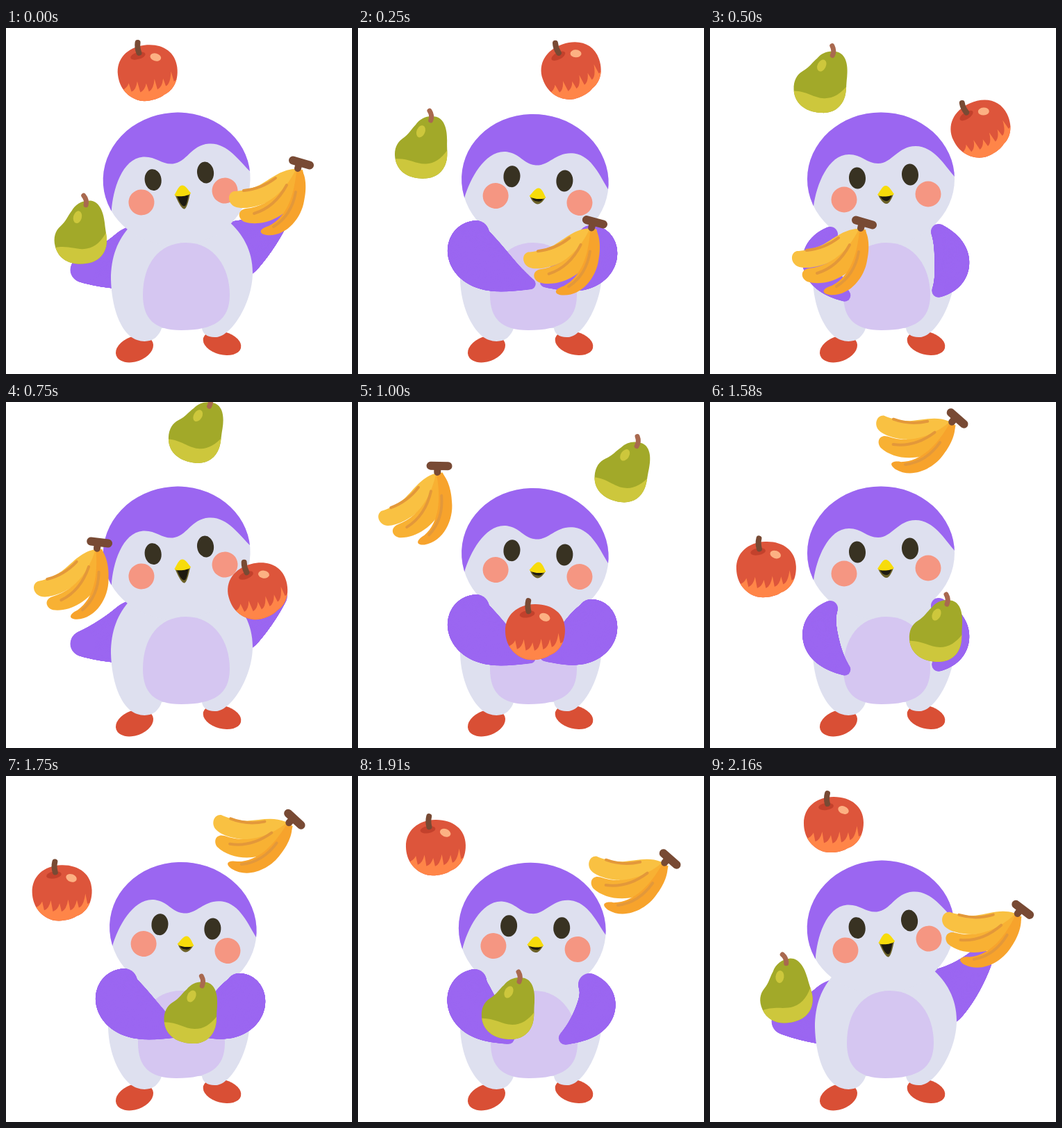
Recreate the animation shown at these times as an HTML page with a canvas. Size 498x498 px, loop 2.25 s.

```html
<!DOCTYPE html>
<html lang="en">
<head>
<meta charset="utf-8">
<title>Juggling penguin</title>
<style>
html, body { margin: 0; width: 100%; height: 100%; overflow: hidden; background: #fff; }
canvas { display: block; width: 498px; height: 498px; }
</style>
</head>
<body>
<canvas id="stage" width="498" height="498"></canvas>
<script>
const ctx = document.getElementById('stage').getContext('2d');
const LOOP = 2250, STEPS = 27, BEAT = 9, TAU = Math.PI * 2;
const PURPLE = '#9b66f1', PALE = '#dee0ef', BELLY = '#d5c6f1', FOOT = '#d94f35';

// ---- helpers
const mix = (a, b, k) => Array.isArray(a) ? a.map((v, i) => mix(v, b[i], k)) : a + (b - a) * k;

function shape(d, color) {
  ctx.fillStyle = color;
  ctx.fill(new Path2D(d));
}

function stroke(d, color, width) {
  ctx.strokeStyle = color;
  ctx.lineWidth = width;
  ctx.lineCap = 'round';
  ctx.stroke(new Path2D(d));
}

function oval(x, y, rx, ry, color, deg = 0) {
  ctx.fillStyle = color;
  ctx.beginPath();
  ctx.ellipse(x, y, rx, ry, deg * Math.PI / 180, 0, TAU);
  ctx.fill();
}

function at(x, y, deg, draw) {
  ctx.save();
  ctx.translate(x, y);
  ctx.rotate(deg * Math.PI / 180);
  draw();
  ctx.restore();
}

// fills a shape, then paints a second one inside it
function layered(d, color, inner, innerColor) {
  shape(d, color);
  ctx.save();
  ctx.clip(new Path2D(d));
  shape(inner, innerColor);
  ctx.restore();
}

// ---- fruit
function spikes() {
  const rim = x => 27 - 0.006 * (x + 5) ** 2;
  let d = 'M-50 20';
  for (let i = 0; i < 7; i++) {
    const x = -39 + 12.5 * i, tip = x + 10;
    d += `L${x} ${rim(x)}Q${x + 7} ${rim(x) - 2} ${tip} ${rim(tip) - 12 - i % 2 * 4}`;
  }
  return d + 'L50 8V50H-50Z';
}

function apple() {
  layered('M-43-2C-43-25-25-40 0-40C25-40 43-26 43-3C43 20 30 31 20 34C12 40-8 42-17 38C-32 32-43 18-43-2Z',
    '#dd553b', spikes(), '#ff8548');
  oval(-11, -26, 11, 5, '#c3412c', -8);
  stroke('M-9-30Q-11-38-9-45', '#784a34', 8);
  oval(14, -21, 8, 5.5, '#fcb183', 22);
}

function pear() {
  ctx.rotate(-16 * Math.PI / 180);
  layered('M-6-33C1-42 12-46 24-43C36-39 39-24 38-8C37 4 38 12 36 20C32 36 20 45 4 45C-16 45-36 36-38 13C-39 0-34-9-26-14C-16-20-13-27-6-33Z',
    '#a2a929', 'M-42 15C-20 13-10 24 6 24C20 24 31 16 42 0V50H-42Z', '#cdc73c');
  oval(1, -23, 6, 9, '#cdc73c', 25);
  stroke('M16-38Q19-45 15-52', '#a9694f', 7);
}

function banana() {
  ctx.translate(45, -48);
  shape('M-10 9C-30 10-45 24-60 32C-75 39-90 41-97 41C-107 44-106 58-96 63C-85 68-60 64-40 52C-20 38-5 25 0 9Z', '#f9c142');
  shape('M-9 12C-18 30-40 62-80 66C-92 68-92 80-82 85C-60 92-30 82-12 60C0 40 6 25 2 10Z', '#f8b133');
  shape('M-7 12C-10 45-20 78-47 91C-61 95-62 102-50 104C-22 107 0 80 4 55C8 38 7 18 0 10Z', '#f7a32c');
  const line = d => stroke(d, '#e3983a', 4);
  line('M-83 40Q-58 38-37 22');
  line('M-68 73Q-38 64-21 32');
  line('M-40 92Q-14 76-8 42');
  stroke('M-3 1L-5 8', '#784a34', 10);
  stroke('M-12-3.5L12 3.5', '#784a34', 12);
}

// ---- orbits: a few [x, y, tilt] points, joined by arcs round the head
const HUB = [240, 190];
const KEYS = [0, 6, 12, 16, 19, 23, 26];

function orbit(points) {
  let last = -Infinity;
  return points.map(([x, y, tilt], i) => {
    const dx = x - HUB[0], dy = y - HUB[1];
    let turn = Math.atan2(dy, dx);
    while (turn < last) turn += TAU;
    last = turn;
    return [KEYS[i], turn, Math.hypot(dx, dy), tilt];
  });
}

function follow(path, f) {
  const n = path.length;
  const key = i => {
    const lap = Math.floor(i / n), [s, turn, r, tilt] = path[(i + n) % n];
    return [s + lap * STEPS, turn + lap * TAU, r, tilt];
  };
  const i = path.findLastIndex(k => k[0] <= f);
  const [a, b, c, d] = [i - 1, i, i + 1, i + 2].map(key);
  const w = c[0] - b[0], u = (f - b[0]) / w;
  const [turn, r, tilt] = [1, 2, 3].map(j => {
    const m0 = (c[j] - a[j]) / (c[0] - a[0]) * w;
    const m1 = (d[j] - b[j]) / (d[0] - b[0]) * w;
    return b[j] * (1 + 2 * u) * (1 - u) ** 2 + m0 * u * (1 - u) ** 2 +
           c[j] * u * u * (3 - 2 * u) + m1 * u * u * (u - 1);
  });
  return [HUB[0] + r * Math.cos(turn), HUB[1] + r * Math.sin(turn), tilt];
}

const FRUIT = [
  [banana, orbit([[380, 242, 0], [177, 328, 0], [86, 150, -15], [206, 54, 12], [295, 48, 25], [388, 144, 25], [391, 221, 21]])],
  [apple, orbit([[204, 64.5, -7], [390, 145, -25], [255, 331, -1], [97, 312, 0], [81, 241, -2], [112, 103, -1], [178, 70, 0]])],
  [pear, orbit([[106, 295, 6], [159, 77, 18], [380, 99, 24], [401, 198, 25], [325, 329, 16], [216, 334, 16], [107, 311, -3]])]
];

// ---- penguin poses
// arm: shoulder, elbow, hand, [shoulder radius, hand radius, bulge]
const OUT = {
  face: [255, 242.5, -4.2], mouth: 16, belly: 0, body: 0, behind: true,
  left: [[190, 330], [150, 345], [110, 348], [46, 18, 0]],
  right: [[330, 320], [362, 303], [389, 279], [42, 16, 0]]
};
const LIFT = { ...OUT,
  left: [[186, 340], [150, 353], [107, 353], [48, 19, 0]],
  right: [[330, 320], [362, 301], [388, 266], [42, 18, 0]]
};
const MID = {
  face: [253.5, 243, 0], mouth: 8, belly: -5, body: -3,
  left: [[173, 297], [135, 341], [195, 386], [11, 8, 16]],
  right: [[329, 293], [368, 341], [328, 379], [11, 9, 15]]
};
const IN = {
  face: [258.5, 246.5, 8.5], mouth: 5, belly: -7, body: -4,
  left: [[170, 296], [140, 335], [250, 369], [19, 7, 25]],
  right: [[335, 302], [357, 337], [268, 366], [18, 7, 25]]
};
const APART = {
  face: [255.5, 247, 6.1], mouth: 5, belly: -6, body: -4,
  left: [[168, 295], [141, 332], [218, 378], [17, 8, 22]],
  right: [[333, 300], [366, 339], [297, 378], [16, 9, 15]]
};

function between(a, b) {
  const pose = {};
  for (const k in a) pose[k] = mix(a[k], b[k], 0.5);
  return pose;
}
const POSES = [OUT, MID, between(MID, IN), IN, between(IN, APART), APART, MID, OUT, LIFT];

// round brush swept from shoulder to hand
function arm([s, e, h, [r0, r1, bulge]]) {
  for (let u = 0; u <= 1; u += 0.01) {
    const [x, y] = mix(mix(s, e, u), mix(e, h, u), u);
    const r = mix(r0, r1, u) + bulge * Math.sin(Math.PI * u);
    oval(x, y, r, r, PURPLE);
  }
}

function arms(pose) {
  arm(pose.left);
  arm(pose.right);
}

function head(mouth) {
  ctx.translate(-253.5, -243);
  oval(246, 217.5, 106, 96, PALE);
  ctx.save();
  ctx.beginPath();
  ctx.ellipse(246, 217.5, 106, 96, 0, 0, TAU);
  ctx.clip();
  shape('M130 257H149C153 226 170 182 200 182C218 182 226 195 242 195C262 195 270 170 296 170C322 170 338 198 352 214H370V100H130Z', PURPLE);
  ctx.restore();
  oval(212, 216, 12, 15.5, '#383222', -4);
  oval(288, 211, 12, 15.5, '#383222', -4);
  oval(193, 247, 18.5, 18.5, '#f59682');
  oval(314, 239, 18.5, 18.5, '#f59682');
  ctx.translate(253, 238);
  const bill = (w, y) => `M${-w} 2C${2 - w} 7 -4 ${y} 1 ${y}C5 ${y} ${w - 2} 7 ${w} 1Z`;
  shape(bill(11, mouth + 7), '#6b6128');
  shape(bill(9, mouth + 3), '#1d1a10');
  shape('M-12 2C-8-3-5-11 0-11C5-11 8-4 12 1C8 5-8 6-12 2Z', '#f7dc0a');
}

function torso(shift) {
  oval(185, 462, 28, 18, FOOT, -20);
  oval(311, 453.5, 28, 16.5, FOOT, 15);
  const l = 151 + shift, r = 355 + shift;
  shape(`M250 270L180 284C160 305 ${l} 330 ${l} 362C${l + 1} 400 163 430 178 443` +
    'C190 453 206 453 215 446C220 441 223 436 224 432L282 432C283 440 290 446 303 445' +
    `C325 443 ${r} 395 ${r} 352C${r} 320 340 295 320 278Z`, PALE);
}

function penguin(pose) {
  if (pose.behind) arms(pose);
  torso(pose.body);
  at(...pose.face, () => head(pose.mouth));
  at(pose.belly, 0, 0, () =>
    shape('M259 309C300 309 322 345 322 384C322 420 300 435 252 435C213 435 197 418 197 384C197 340 220 309 259 309Z', BELLY));
  if (!pose.behind) arms(pose);
}

function paint() {
  const t = performance.now() % LOOP;
  // steps begin on whole hundredths of a second
  const f = Math.min(STEPS - 1, Math.floor((Math.floor(t / 10) * 10 + 9.9) * STEPS / LOOP));
  ctx.fillStyle = '#fff';
  ctx.fillRect(0, 0, 498, 498);
  penguin(POSES[f % BEAT]);
  for (const [draw, path] of FRUIT) at(...follow(path, f), draw);
  requestAnimationFrame(paint);
}
paint();
</script>
</body>
</html>
```
